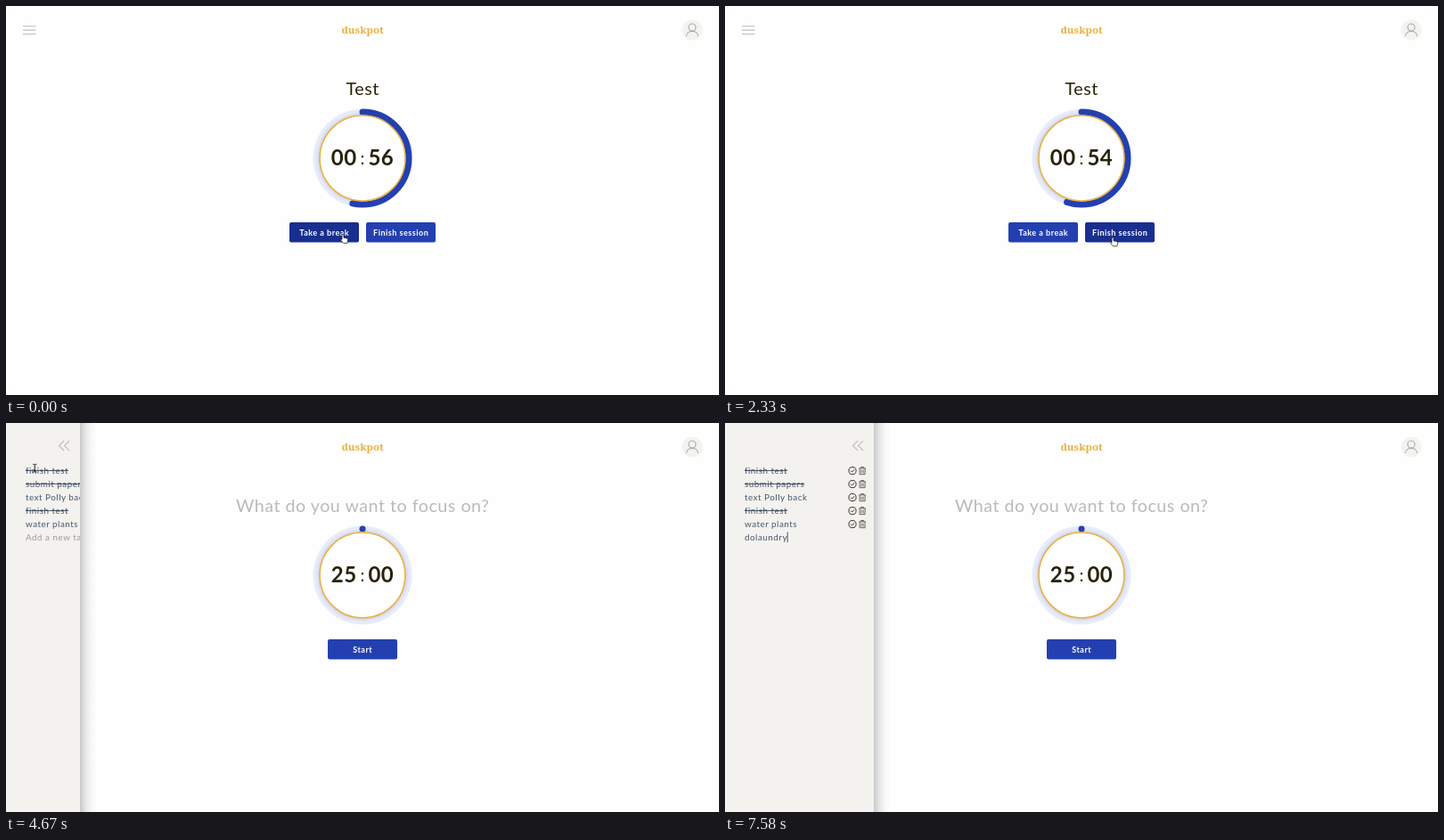
An HTML page that plays this animation: 800 px wide and 437 px high, repeating every 8 s.

```html
<!DOCTYPE html>
<html lang="en">
<head>
<meta charset="utf-8">
<title>Focus timer</title>
<style>
  html, body { margin: 0; width: 100%; height: 100%; overflow: hidden; background: #fefefe; }
  #stage { display: block; width: 100vw; height: 100vh; }
  text { font-family: Lato, sans-serif; letter-spacing: .5px; white-space: pre; }
  .mid { text-anchor: middle; }
  .logo { font: 700 11.5px "Noto Serif", serif; letter-spacing: 0; fill: #e9b141; }
  .title { font-size: 19.7px; fill: #28230a; }
  .digits { font-size: 24px; font-weight: 700; fill: #28230a; }
  .label { font-size: 9px; font-weight: 700; fill: #fff; }
  .task { font-size: 9.85px; fill: #46576a; }
  .done { text-decoration: line-through; }
  .line { fill: none; stroke: #bdbdbd; stroke-width: 1.1; }
  .icon { fill: none; stroke: #33332e; stroke-width: 1; }
</style>
</head>
<body>
<svg id="stage" viewBox="0 0 800 437">
  <defs>
    <linearGradient id="fade">
      <stop offset="0" stop-opacity=".21"/>
      <stop offset=".35" stop-opacity=".09"/>
      <stop offset=".65" stop-opacity=".03"/>
      <stop offset="1" stop-opacity="0"/>
    </linearGradient>
    <radialGradient id="glow" gradientUnits="userSpaceOnUse" cx="400" cy="171" r="56">
      <stop offset=".85" stop-color="#ccd0e2"/>
      <stop offset=".93" stop-color="#e5e9f9"/>
      <stop offset="1" stop-color="#ebeefb"/>
    </radialGradient>
    <g id="taskIcons" class="icon">
      <circle cx="143" r="4.1"/>
      <path d="M141.1 .1l1.4 1.4 2.5-2.8"/>
      <path d="M150.2 -2.7H158M152.6 -2.8V-4.1H155.6V-2.8M151.1 -2.5V4.1H157.1V-2.5M153.1 -1V2.8M155.1 -1V2.8" stroke="#55554f" stroke-width=".9"/>
    </g>
  </defs>

  <rect width="800" height="437" fill="#fefefe"/>
  <path class="line" d="M19 22.7H33.5M19 27.1H33.5M19 31.5H33.5"/>
  <text class="logo mid" x="400" y="31">duskpot</text>
  <circle cx="770" cy="27" r="11.5" fill="#f4f3ef"/>
  <g class="line" stroke-width="1.1" style="stroke:#aaa">
    <circle cx="770" cy="24" r="4"/>
    <path d="M763.5 34C763.5 26.5 776.5 26.5 776.5 34"/>
  </g>

  <text class="title mid" id="title" x="400.2" y="99.5"></text>
  <circle cx="400" cy="171" r="55.5" fill="url(#glow)"/>
  <circle id="arc" cx="400" cy="171" r="52" pathLength="360" fill="none" stroke="#2440b0"
    stroke-width="7" stroke-linecap="round" transform="rotate(-90 400 171)"/>
  <circle cx="400" cy="171" r="47.9" fill="#fefefe" stroke="#e9b141" stroke-width="1.5"/>
  <text class="digits mid" id="minutes" x="379.2" y="179.3"></text>
  <text class="title mid" x="400.2" y="178">:</text>
  <text class="digits mid" id="seconds" x="420.8" y="179.3"></text>
  <g id="buttons"></g>

  <rect id="shadow" y="0" width="19" height="437" fill="url(#fade)"/>
  <svg id="sidebar" height="437" overflow="hidden">
    <rect width="167" height="437" fill="#f4f2ee"/>
    <path id="collapse" class="line" d="M-18 20L-23.5 25.5L-18 31M-12 20L-17.5 25.5L-12 31"/>
    <g id="tasks"></g>
    <text class="task" id="entry" x="22" y="131.8"></text>
    <rect id="caret" y="122.5" width="1" height="11.5" fill="#46576a"/>
  </svg>

  <g id="cursor">
    <path id="arrow" d="M0 0V8.2L1.9 6.5L3.1 9.4L4.4 8.8L3.2 6H5.6Z" fill="#111" stroke="#fff" stroke-width=".6"/>
    <path id="hand" d="M-1 1Q0 -.6 1 1V4.3L4.6 5Q6 5.4 5.7 7L4.8 10.4H.5L-2.6 6.8Q-2.2 5.5 -1 6.3Z" fill="#fff" stroke="#222" stroke-width=".8"/>
    <path id="beam" d="M-2 -4.5Q0 -4.5 0 -3.4Q0 -4.5 2 -4.5M0 -3.4V3.4M-2 4.5Q0 4.5 0 3.4Q0 4.5 2 4.5" fill="none" stroke="#222"/>
  </g>
</svg>
<script>
const LOOP = 8000, FPS = 12;
const TICKS = [640, 1640], FINISH = 2440, OPEN = 4480, FOCUS = 5980;
const KEYS = [[6060, "d"], [6150, "o"], [6490, "l"], [6650, "a"], [6820, "u"],
              [6900, "n"], [7070, "d"], [7320, "r"], [7490, "y"]];
// time, x, y of the pointer's hot spot
const POINTER = [
  [0, 378, 256], [790, 406.5, 283], [960, 406.5, 283], [1660, 435, 259.5], [2500, 435, 259.5],
  [3300, 154, 123.5], [3430, 154, 123.5], [3990, 36, 28], [4340, 36, 28], [4900, 30, 64.5],
  [5170, 32, 72], [5570, 58.7, 130.5], [LOOP, 58.7, 130.5]
];
const TASKS = [["finish test", true], ["submit papers", true], ["text Polly back", false],
               ["finish test", true], ["water plants", false]];

const el = id => document.getElementById(id);
const set = (id, attrs) => {
  for (const name in attrs) el(id).setAttribute(name, attrs[name]);
};
const show = (id, visible) => set(id, { visibility: visible ? "visible" : "hidden" });
const clamp = x => Math.min(1, Math.max(0, x));
const bezier = (s, a, b) => 3 * a * s * (1 - s) ** 2 + 3 * b * s * s * (1 - s) + s ** 3;

// the CSS "ease" curve
function ease(x) {
  x = clamp(x);
  let low = 0, high = 1;
  for (let i = 0; i < 18; i++) {
    const mid = (low + high) / 2;
    if (bezier(mid, .25, .25) < x) low = mid; else high = mid;
  }
  return bezier(high, .1, 1);
}

const BUTTONS = [
  { id: "pause", x: 318, text: "Take a break", running: true },
  { id: "finish", x: 404, text: "Finish session", running: true },
  { id: "start", x: 361, text: "Start", running: false }
];
el("buttons").innerHTML = BUTTONS.map(b => `<g id="${b.id}">
  <rect x="${b.x}" y="243" width="78" height="22.5" rx="2"/>
  <text class="label mid" x="${b.x + 39.2}" y="257.8">${b.text}</text></g>`).join("");
el("tasks").innerHTML = TASKS.map(([text, done], i) => `
  <text class="task${done ? " done" : ""}" x="22" y="${56.8 + 15 * i}">${text}</text>
  <use href="#taskIcons" y="${53.6 + 15 * i}"/>`).join("");

function pointerAt(t) {
  const i = POINTER.findIndex(p => p[0] > t);
  const [t0, x0, y0] = POINTER[i - 1], [t1, x1, y1] = POINTER[i];
  const p = (t - t0) / (t1 - t0), k = p * p * (3 - 2 * p);
  return [x0 + (x1 - x0) * k, y0 + (y1 - y0) * k];
}

function drawTimer(t) {
  const running = t < FINISH;
  const ticks = TICKS.filter(at => t >= at).length;
  const angle = TICKS.reduce((a, at) => a + 3 * ease((t - at) / 500), 192.5);
  const sweep = angle * (1 - ease((t - FINISH) / 500));
  el("title").textContent = running ? "Test" : "What do you want to focus on?";
  el("title").style.fill = running ? "" : "#bababa";
  el("minutes").textContent = running ? "00" : "25";
  el("seconds").textContent = running ? 56 - ticks : "00";
  set("arc", { "stroke-dasharray": `${Math.max(sweep, .01)} 360` });
}

function drawSidebar(t) {
  const width = 167 * ease((t - OPEN) / 640);
  set("sidebar", { width });
  set("shadow", { x: width, opacity: clamp(width / 20) });
  set("collapse", { transform: `translate(${width})` });
  const typed = KEYS.filter(k => t >= k[0]).map(k => k[1]).join("");
  const entry = el("entry");
  entry.textContent = t < FOCUS ? "Add a new task" : typed;
  entry.style.fill = t < FOCUS ? "#9c9c9a" : "";
  show("caret", typed);
  if (typed) set("caret", { x: 21.7 + entry.getComputedTextLength() });
}

function drawPointer(t) {
  const [x, y] = pointerAt(t);
  let overButton = false;
  for (const b of BUTTONS) {
    const active = b.running === t < FINISH;
    const hover = active && x >= b.x && x <= b.x + 78 && y >= 243 && y <= 265.5;
    overButton ||= hover;
    set(b.id, { fill: hover ? "#192f8f" : "#2440b0", display: active ? "inline" : "none" });
  }
  const overMenu = x < 42 && y < 40;
  const overText = t > OPEN && y > 46;
  const visible = t < KEYS[0][0];
  set("cursor", { transform: `translate(${x} ${y})` });
  show("hand", visible && (overButton || overMenu));
  show("beam", visible && overText);
  show("arrow", visible && !overButton && !overMenu && !overText);
}

function draw(now) {
  const step = Math.floor((now % LOOP + 4) * FPS / 1000);
  const t = step * 1000 / FPS % LOOP;
  drawTimer(t);
  drawSidebar(t);
  drawPointer(t);
}

let begin;
function frame(now) {
  begin ??= now;
  draw(now - begin);
  requestAnimationFrame(frame);
}
draw(0);
requestAnimationFrame(frame);
</script>
</body>
</html>
```
